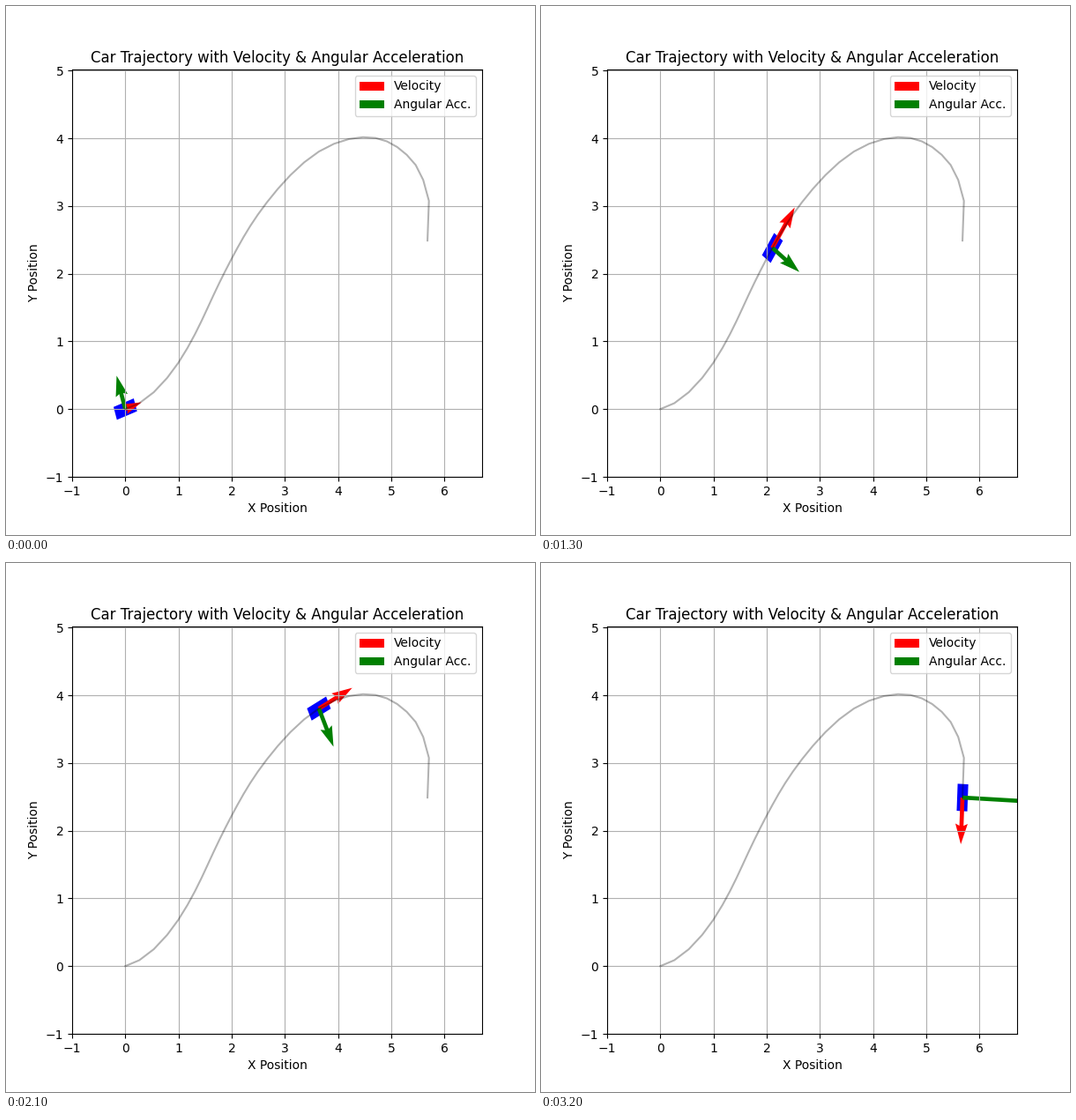
A matplotlib script that plays this animation: 600x600 px, repeating every 3300 ms.

```python
import numpy as np
import matplotlib.pyplot as plt
from matplotlib.animation import FuncAnimation
from matplotlib.patches import Polygon

FRAMES = 33
CAR_LENGTH, CAR_WIDTH = 0.4, 0.2

# Waypoints: step, x, y
WAYPOINTS = np.array([
    (0, 0, 0), (1, .265, .088), (3, .788, .462), (5, 1.168, .902),
    (9, 1.656, 1.68), (13, 2.108, 2.381), (17, 2.663, 3.055),
    (21, 3.64, 3.805), (24, 4.47, 4.0175), (28, 5.292, 3.757),
    (30, 5.602, 3.385), (31, 5.709, 3.077)])
END = (5.682, 2.49)


def spline(knots, values, at):
    """Natural cubic spline, built from |r|^3 terms plus a plane."""
    n = len(knots)
    plane = np.column_stack([np.ones(n), knots])
    cubes = np.abs(knots[:, None] - knots) ** 3
    system = np.block([[cubes, plane], [plane.T, np.zeros((2, 2))]])
    rhs = np.vstack([values, np.zeros((2, values.shape[1]))])
    weights = np.linalg.solve(system, rhs)
    basis = np.column_stack([np.abs(at[:, None] - knots) ** 3,
                             np.ones(len(at)), at])
    return basis @ weights


step = np.arange(FRAMES)
# A smooth curve, then one straight leg to the end.
curve = spline(WAYPOINTS[:, 0], WAYPOINTS[:, 1:], step[:-1])
path = np.vstack([curve, END])
x, y = path.T

# The first and last legs take twice as long as the others.
t = step + (step > 0) + (step == FRAMES - 1)
heading = np.arctan2(np.gradient(y, t), np.gradient(x, t))

speed = np.interp(step, [0, 6, 12, 18, 24, 28, 32],
                  [.32, .58, .72, .785, .61, .53, .69])
# Steady right turn with a kick at each end of the drive.
ang_acc = np.interp(step, [0, 3, 29, 31], [.52, -.61, -.635, 1.5])


def car_corners(i):
    c, s = np.cos(heading[i]), np.sin(heading[i])
    box = np.array([(-1, -1), (1, -1), (1, 1), (-1, 1)])
    box = box * (CAR_LENGTH / 2, CAR_WIDTH / 2)
    return box @ np.array([[c, s], [-s, c]]) + path[i]


def arrow(color, label):
    return ax.quiver(0, 0, 1, 0, angles="xy", scale_units="xy", scale=1,
                     width=0.01, color=color, label=label)


def point(quiver, i, length, angle):
    quiver.set_offsets(path[i:i + 1])
    # Angles are worked out from the arrow's base in data space.
    quiver.XY = path[i:i + 1]
    quiver.X, quiver.Y = x[i:i + 1], y[i:i + 1]
    quiver.set_UVC([length * np.cos(angle)], [length * np.sin(angle)])


fig, ax = plt.subplots(figsize=(6, 6), dpi=100)
ax.set_xlim(-1, x.max() + 1)
ax.set_ylim(-1, y.max() + 1)
ax.set_xlabel("X Position")
ax.set_ylabel("Y Position")
ax.set_title("Car Trajectory with Velocity & Angular Acceleration")
ax.grid(True)
ax.plot(x, y, "k-", alpha=0.3)

car = ax.add_patch(Polygon(car_corners(0), facecolor="blue", linewidth=0))
velocity = arrow("red", "Velocity")
turning = arrow("green", "Angular Acc.")
ax.legend(loc="upper right")


def update(i):
    car.set_xy(car_corners(i))
    point(velocity, i, speed[i], heading[i])
    point(turning, i, ang_acc[i], heading[i] + np.pi / 2)
    return car, velocity, turning


anim = FuncAnimation(fig, update, frames=FRAMES, interval=100, repeat=True,
                     repeat_delay=0)
plt.show()
```
